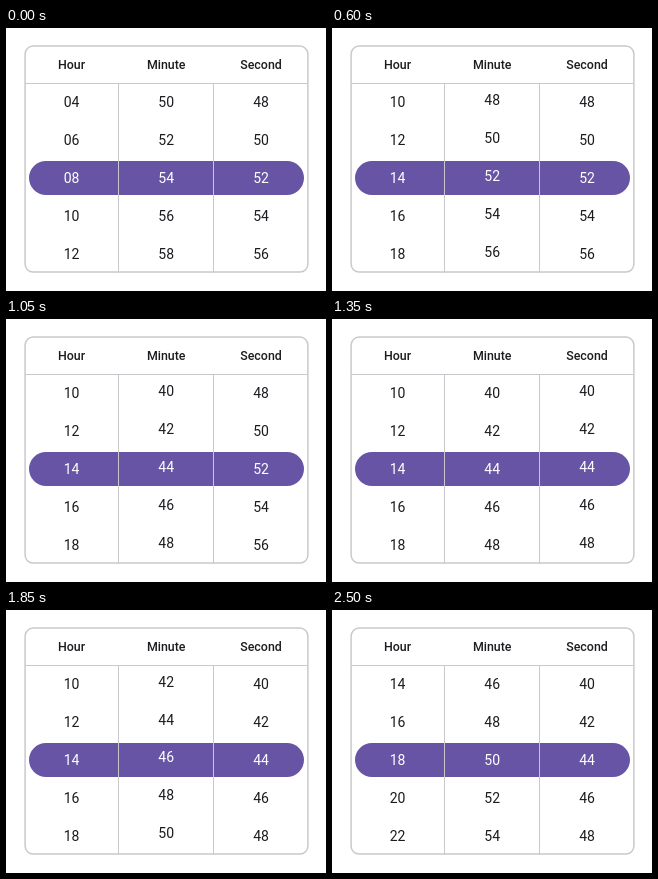
Recreate the animation shown at these times as an HTML page with a canvas. Size 320 by 263 pixels, loop 2.95 s.

```html
<!DOCTYPE html>
<html lang="en">
<head>
<meta charset="utf-8">
<title>Time picker</title>
<style>
html, body { margin: 0; width: 100%; height: 100%; overflow: hidden; background: #fff; }
canvas { display: block; width: 320px; height: 263px; }
</style>
</head>
<body>
<canvas id="stage"></canvas>
<script>
const W = 320, H = 263, LOOP = 2950, TICK = 50;
const TOP = 55.5, BOTTOM = 244.5, ROW = 37.9, MID = 150.2;
const PURPLE = '#6754a5', INK = '#1c1b1f', LINE = '#cac8cc';

const canvas = document.getElementById('stage');
const ctx = canvas.getContext('2d');
const dpr = window.devicePixelRatio || 1;
canvas.width = W * dpr;
canvas.height = H * dpr;
ctx.scale(dpr, dpr);

const px = n => n / ROW;   // pixels expressed in rows

// Each move: start, end (ms), first and last position in rows, easing power
const columns = [
  { title: 'Hour', x: 65.5, count: 12, moves: [
    [50, 400, 4, 7 + px(2), 1.3], [500, 550, 7 + px(2), 7, 1],
    [2100, 2300, 7, 9 + px(2.5), 1.2], [2350, 2500, 9 + px(2.5), 9, 1]] },
  { title: 'Minute', x: 160.2, count: 30, moves: [
    [500, 600, 27, 26 + px(2), 1], [600, 900, 26 + px(2), 22 + px(2), 1.2],
    [1050, 1150, 22 + px(2), 22, 1],
    [1750, 2100, 22, 25 + px(1), 1.3], [2100, 2200, 25 + px(1), 25, 1]] },
  { title: 'Second', x: 255, count: 30, moves: [
    [1050, 1350, 26, 22 + px(2), 1.3], [1400, 1550, 22 + px(2), 22, 1]] }
];

function position(moves, t) {
  let pos = moves[0][2];
  for (const [start, end, from, to, power] of moves) {
    if (t < start) break;
    const p = Math.min(1, (t - start) / (end - start));
    pos = from + (to - from) * (1 - Math.pow(1 - p, power));
  }
  return pos;
}

function line(x1, y1, x2, y2) {
  ctx.beginPath();
  ctx.moveTo(x1, y1);
  ctx.lineTo(x2, y2);
  ctx.stroke();
}

function box(x, y, w, h, r) {
  ctx.beginPath();
  ctx.roundRect(x, y, w, h, r);
}

function drawColumn({ x, count, moves }, t) {
  const pos = position(moves, t);
  const chosen = Math.round(pos);
  for (let i = chosen - 3; i <= chosen + 3; i++) {
    const value = (i + count) % count * 2;
    ctx.fillStyle = i === chosen ? '#fff' : INK;
    ctx.fillText(String(value).padStart(2, '0'), x, MID + (i - pos) * ROW + 5);
  }
}

function draw(t) {
  ctx.fillStyle = '#fff';
  ctx.fillRect(0, 0, W, H);
  ctx.textAlign = 'center';
  ctx.textBaseline = 'alphabetic';

  ctx.fillStyle = PURPLE;
  box(23, 133, 275, 34, 17);
  ctx.fill();

  ctx.save();
  ctx.beginPath();
  ctx.rect(19, TOP, 283, BOTTOM - TOP);
  ctx.clip();
  ctx.font = '400 14px Roboto, sans-serif';
  columns.forEach(c => drawColumn(c, t));
  ctx.restore();

  ctx.font = '500 12.4px Roboto, sans-serif';
  ctx.fillStyle = INK;
  columns.forEach(c => ctx.fillText(c.title, c.x, 41));

  ctx.strokeStyle = LINE;
  ctx.lineWidth = 1;
  line(19, TOP, 302, TOP);
  line(112.5, TOP, 112.5, BOTTOM);
  line(207.5, TOP, 207.5, BOTTOM);
  ctx.lineWidth = 1.5;
  box(19.1, 18.1, 282.8, 226, 8);
  ctx.stroke();
}

function frame() {
  const t = performance.now() % LOOP;
  draw(Math.floor(t / TICK) * TICK);
  requestAnimationFrame(frame);
}
frame();
</script>
</body>
</html>
```
